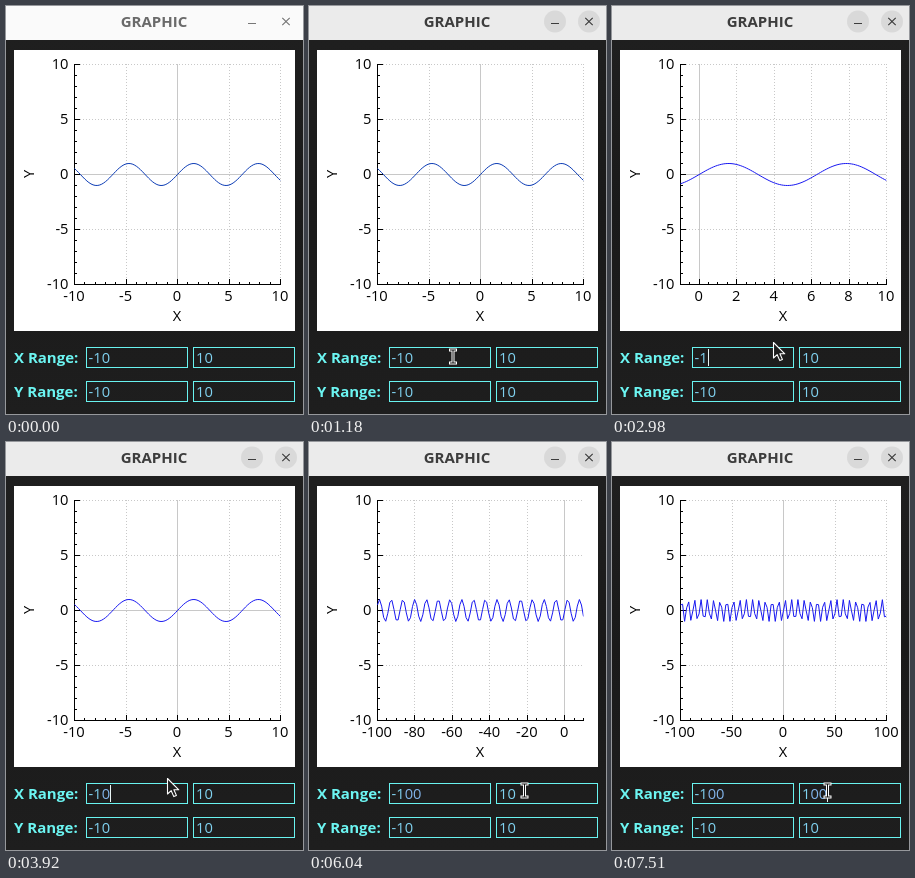
These frames come from a looping animation (297x408 px, 8 s). An HTML page:

```html
<!DOCTYPE html>
<html lang="en">
<head>
<meta charset="utf-8">
<title>Graphic</title>
<style>
  html, body { margin: 0; width: 100%; height: 100%; overflow: hidden; background: #1e1e1e; }
  svg { display: block; width: 297px; height: 408px; }
  text { font: 14.67px "Open Sans", "Noto Sans", sans-serif; white-space: pre; }
  .bold { font-weight: 700; font-size: 15px; }
  .label { fill: #6cf5f2; }
  .value { fill: #80d2f0; }
  .typed { fill: #82b4ea; }
  .field { fill: none; stroke: #69f3f0; }
  .crisp, .field { shape-rendering: crispEdges; }
  .mid { text-anchor: middle; }
  .end { text-anchor: end; }
  #bar { fill: #fafafa; }
  #title { fill: #6a6a6a; }
  #icons { stroke: #777; fill: none; }
  #discs { fill: #d9d9d9; visibility: hidden; }
  .active #bar { fill: #ebebeb; }
  .active #title { fill: #3d3d3d; }
  .active #icons { stroke: #3d3d3d; }
  .active #discs { visibility: visible; }
  .grid { stroke: #c8c8c8; stroke-dasharray: 1 2; }
  .zero { stroke: #c8c8c8; }
  .axis { stroke: #000; fill: none; }
  #curve { fill: none; stroke: #1818f0; }
  #curve.first { stroke: #0b3bb4; }
</style>
</head>
<body>
<svg id="win" viewBox="0 0 297 408">
  <defs>
    <linearGradient id="back" x2="0" y2="1">
      <stop offset="0" stop-color="#202020"/>
      <stop offset=".5" stop-color="#1a1a1a"/>
      <stop offset="1" stop-color="#1e1e1e"/>
    </linearGradient>
    <clipPath id="clip"><rect x="68" y="58" width="206.5" height="221"/></clipPath>
  </defs>
  <rect width="297" height="408" fill="url(#back)"/>
  <rect id="bar" width="297" height="34"/>
  <text id="title" class="bold mid" x="148" y="21">GRAPHIC</text>
  <g id="discs"><circle cx="246" cy="15.5" r="11"/><circle cx="280" cy="15.5" r="11"/></g>
  <path id="icons" stroke-width="1.2" d="M242 17.5h8M276.3 11.8l7.4 7.4m0-7.4l-7.4 7.4"/>

  <rect x="8" y="44" width="281" height="281" fill="#fff"/>
  <g id="plot"></g>
  <g clip-path="url(#clip)"><polyline id="curve"/></g>
  <text class="mid" x="171" y="315">X</text>
  <text class="mid" transform="translate(28 168) rotate(-90)">Y</text>

  <text class="bold label" x="8" y="357">X Range:</text>
  <text class="bold label" x="8" y="391">Y Range:</text>
  <rect class="field" x="80.5" y="341.5" width="101" height="20"/>
  <rect class="field" x="187.5" y="341.5" width="101" height="20"/>
  <rect class="field" x="80.5" y="375.5" width="101" height="20"/>
  <rect class="field" x="187.5" y="375.5" width="101" height="20"/>
  <text id="low" class="value" x="82.6" y="357"></text>
  <text id="high" class="value" x="190" y="357"></text>
  <text class="value" x="82.6" y="391">-10</text>
  <text class="value" x="190" y="391">10</text>
  <rect id="caret" y="343" width="1" height="17" fill="#e8f4f4"/>

  <path id="arrow" fill="#1c1c1c" stroke="#fff" stroke-width="1.1" stroke-linejoin="round"
        d="M.5.5V16L4.2 12.7 6.8 18.6 9.4 17.4 6.9 11.8H11.8Z"/>
  <g id="beam" fill="none">
    <path stroke="#fff" stroke-width="3" d="M-4-6.5H4M-4 6.5H4M0-6.5V6.5"/>
    <path stroke="#111" stroke-width="1" d="M-3-6.5H3M-3 6.5H3M0-6.5V6.5"/>
  </g>
</svg>
<script>
const LOOP = 8000, FOCUS = 1180;
const L = 68, R = 274, T = 58, B = 278, POINTS = 100;

// [time, text of lower limit, text of upper limit]
const edits = [
  [0, '-10', '10'], [2980, '-1', '10'], [3850, '-10', '10'], [4320, '-100', '10'],
  [6180, '-100', '1'], [7050, '-100', '10'], [7510, '-100', '100']
];
// [time, caret x], no x while hidden
const carets = [
  [0], [1250, 104], [1780], [2310, 104], [2910], [2980, 96], [3650], [3850, 104],
  [4320, 113], [4980], [5640, 207], [6040], [6180, 198], [6910], [7050, 207], [7510, 215]
];
// [time, pointer x, y]
const moves = [
  [0], [640, 284, 398], [710, 246, 387], [780, 206, 371], [840, 174, 359], [910, 153, 353],
  [980, 144, 350.5], [1780, 149, 350], [1850, 156, 346], [1920, 161, 336], [4910, 157, 337],
  [4980, 184, 350], [5040, 210, 364], [5110, 224, 371], [5250, 222, 366], [5320, 218, 357],
  [5380, 214, 349], [5450, 212.5, 345], [5640, 215.5, 348.5]
];

const $ = id => document.getElementById(id);
const at = (list, t) => list.findLast(e => e[0] <= t);
const snap = v => Math.round(v) + .5;
const show = (el, on) => el.style.visibility = on ? 'visible' : 'hidden';
const line = (cls, x1, y1, x2, y2) =>
  `<line class="crisp ${cls}" x1="${x1}" y1="${y1}" x2="${x2}" y2="${y2}"/>`;
const label = (cls, x, y, s) => `<text class="${cls}" x="${x}" y="${y}">${s}</text>`;

// Roughly five ticks, on a round step
function tickStep(range) {
  const raw = range / 5, mag = 10 ** Math.floor(Math.log10(raw));
  const m = [1, 2, 2.5, 5, 10].reduce((a, b) =>
    Math.abs(b - raw / mag) < Math.abs(a - raw / mag) ? b : a);
  return { step: m * mag, parts: m === 2 ? 4 : 5 };
}

function eachTick(lo, hi, draw) {
  const { step, parts } = tickStep(hi - lo), sub = step / parts;
  for (let i = Math.ceil(lo / sub); i <= hi / sub + 1e-9; i++)
    draw(i * sub, i % parts === 0);
}

function drawPlot(lo, hi) {
  const px = x => L + (x - lo) / (hi - lo) * (R - L);
  const py = y => B - (y + 10) / 20 * (B - T);
  let grid = '', axes = '';
  eachTick(lo, hi, (v, major) => {
    const x = snap(px(v));
    axes += line('axis', x, B, x, B - (major ? 5 : 2));
    if (!major) return;
    grid += line(v ? 'grid' : 'zero', x, B, x, T);
    axes += label('mid', px(v), 295, Math.round(v) || 0);
  });
  eachTick(-10, 10, (v, major) => {
    const y = snap(py(v));
    axes += line('axis', L, y, L + (major ? 6 : 3), y);
    if (!major) return;
    grid += line(v ? 'grid' : 'zero', L, y, R, y);
    axes += label('end', 62.5, py(v) + 5.2, v || 0);
  });
  axes += line('axis', L + .5, T, L + .5, B + 1) + line('axis', L, B + .5, R + 1, B + .5);
  $('plot').innerHTML = grid + axes;

  const pts = [];
  for (let i = 0; i <= POINTS; i++) {
    const x = lo + (hi - lo) * i / POINTS;
    pts.push((px(x) + .5).toFixed(2) + ',' + (py(Math.sin(x)) + .5).toFixed(2));
  }
  $('curve').setAttribute('points', pts.join(' '));
}

function setValue(el, s, kept) {
  el.innerHTML = s.slice(0, kept) + `<tspan class="typed">${s.slice(kept)}</tspan>`;
}

const inField = (x, y) =>
  (x > 80 && x < 182 || x > 187 && x < 289) && (y > 341 && y < 362 || y > 375 && y < 396);

let shown;
function frame(now) {
  const t = now % LOOP;
  $('win').classList.toggle('active', t >= FOCUS);

  const edit = at(edits, t);
  if (edit !== shown) {
    shown = edit;
    const [time, low, high] = edit;
    drawPlot(+low, +high);
    $('curve').classList.toggle('first', time === 0);
    setValue($('low'), low, time ? 2 : 3);
    setValue($('high'), high, time < 7000 ? 2 : 1);
  }

  const caretX = at(carets, t)[1];
  show($('caret'), caretX);
  if (caretX) $('caret').setAttribute('x', caretX);

  const [, x, y] = at(moves, t), beam = inField(x, y);
  show($('arrow'), x && !beam);
  show($('beam'), x && beam);
  if (x) $(beam ? 'beam' : 'arrow').setAttribute('transform', `translate(${x} ${y})`);
  requestAnimationFrame(frame);
}
frame(0);
</script>
</body>
</html>
```
